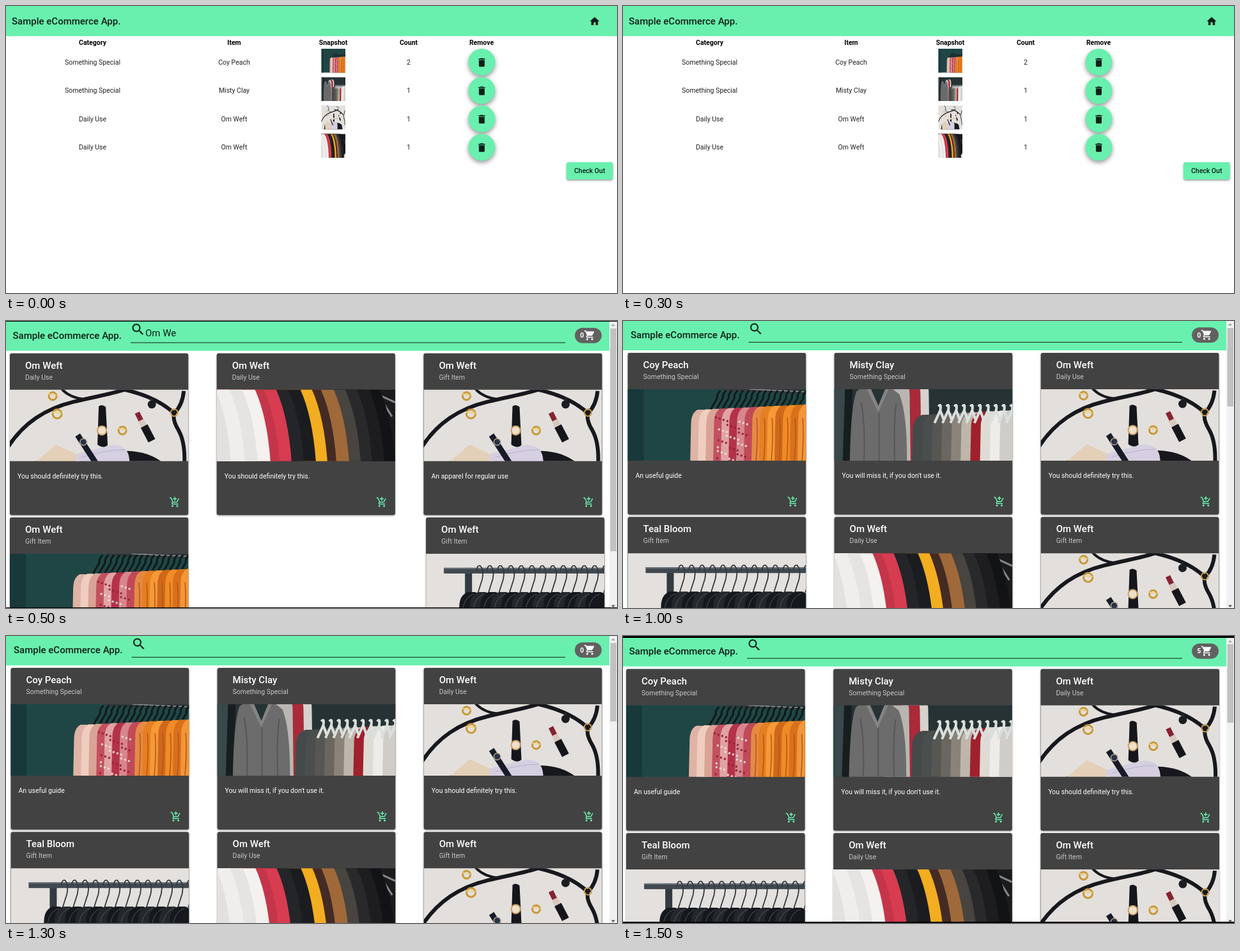
Write an HTML page with a canvas that moves like this. It is 956 by 450 pixels and loops after 2 s.

```html
<!DOCTYPE html>
<html lang="en">
<head>
<meta charset="utf-8">
<title>Shop demo</title>
<style>
  html, body { margin: 0; width: 956px; height: 450px; overflow: hidden; background: #fff; }
  canvas { display: block; }
</style>
</head>
<body>
<canvas id="stage" width="956" height="450"></canvas>
<script>
const ctx = document.getElementById('stage').getContext('2d');
const GREEN = '#69f0ae', DARK = '#424242', INK = 'rgba(0,0,0,.87)';
const PHOTO_W = 279, PHOTO_H = 112, PHOTO_FULL = 186;

const wheels = 'M7 18a2 2 0 1 0 0 4a2 2 0 1 0 0-4zM17 18a2 2 0 1 0 0 4a2 2 0 1 0 0-4z';
const icons = {
  home: 'M10 20v-6h4v6h5v-8h3L12 3 2 12h3v8z',
  trash: 'M6 19c0 1.1.9 2 2 2h8c1.1 0 2-.9 2-2V7H6v12zM19 4h-3.5l-1-1h-5l-1 1H5v2h14V4z',
  search: 'M15.5 14h-.79l-.28-.27C15.41 12.59 16 11.11 16 9.5 16 5.91 13.09 3 9.5 3S3 5.91 3 9.5 5.91 16 9.5 16c1.61 0 3.09-.59 4.23-1.57l.27.28v.79l5 4.99L20.49 19l-4.99-5zm-6 0C7.01 14 5 11.99 5 9.5S7.01 5 9.5 5 14 7.01 14 9.5 11.99 14 9.5 14z',
  cart: wheels + 'M1 2v2h2l3.6 7.59-1.35 2.45c-.16.28-.25.61-.25.96 0 1.1.9 2 2 2h12v-2H7.42c-.14 0-.25-.11-.25-.25l.03-.12.9-1.63h7.45c.75 0 1.41-.41 1.75-1.03l3.58-6.49c.08-.14.12-.31.12-.48 0-.55-.45-1-1-1H5.21l-.94-2H1z',
  addCart: wheels + 'M11 9h2V6h3V4h-3V1h-2v3H8v2h3v3zM7.17 14.75l.03-.12.9-1.63h7.45c.75 0 1.41-.41 1.75-1.03l3.86-7.01L19.42 4l-1.1 2-2.76 5H8.53L6.16 6 4.27 2H1v2h2l3.6 7.59-1.35 2.45c-.16.28-.25.61-.25.96 0 1.1.9 2 2 2h12v-2H7.42c-.13 0-.25-.11-.25-.25z'
};

function fill(color, d) {
  ctx.fillStyle = color;
  ctx.fill(new Path2D(d));
}
function line(color, width, d) {
  ctx.strokeStyle = color;
  ctx.lineWidth = width;
  ctx.stroke(new Path2D(d));
}
function rect(color, x, y, w, h) {
  ctx.fillStyle = color;
  ctx.fillRect(x, y, w, h);
}
function disc(color, x, y, r) {
  ctx.fillStyle = color;
  ctx.beginPath();
  ctx.arc(x, y, r, 0, 7);
  ctx.fill();
}
function ring(color, width, x, y, r) {
  ctx.strokeStyle = color;
  ctx.lineWidth = width;
  ctx.beginPath();
  ctx.arc(x, y, r, 0, 7);
  ctx.stroke();
}
function box(color, x, y, w, h, r, blur = 0, drop = 0) {
  ctx.save();
  ctx.shadowColor = 'rgba(0,0,0,.42)';
  ctx.shadowBlur = blur;
  ctx.shadowOffsetY = drop;
  ctx.fillStyle = color;
  ctx.beginPath();
  ctx.roundRect(x, y, w, h, r);
  ctx.fill();
  ctx.restore();
}
function text(str, x, y, size = 10.5, weight = 400, color = INK, align = 'left') {
  ctx.font = `${weight} ${size}px Roboto, sans-serif`;
  ctx.textAlign = align;
  ctx.fillStyle = color;
  ctx.fillText(str, x, y);
}
function icon(name, x, y, size, color) {
  ctx.save();
  ctx.translate(x, y);
  ctx.scale(size / 24, size / 24);
  fill(color, icons[name]);
  ctx.restore();
}

// A hanging garment with rounded shoulders, reaching below the crop.
function garment(color, x, top, w, flare = 3) {
  fill(color, `M${x + w * .35} ${top}h${w * .3}Q${x + w} ${top + 5} ${x + w} ${top + 24}L${x + w + flare} 150H${x - flare}L${x} ${top + 24}Q${x} ${top + 5} ${x + w * .35} ${top}Z`);
}

// Photos use a 279 x 112 crop and extend 37 units above and below it.
const photos = {
  rack() {
    rect('#1f4644', 0, -37, 279, 187);
    rect('#17393a', 0, -37, 25, 187);
    fill('#30383a', 'M150-3L279-1V7L150 3Z');
    line('#8d9595', 1.5, 'M190 0L279 4');
    for (let i = 0; i < 16; i++) {
      const x = 138 + i * 9;
      line('#0f191a', 3, `M${x + 7} 2Q${x + 1} 8 ${x + 2} 14L${x - 9} 33`);
    }
    const colors = ['#dfb3a6', '#efcdbf', '#d9a396', '#c3505f', '#e0a3a4', '#b3324a', '#d6868c', '#c04a58',
      '#e58a45', '#e57f22', '#f59a35', '#cf681b', '#f08b25', '#d9701c', '#f29638'];
    colors.forEach((c, i) => garment(c, 99 + i * 12, 32 - i * .6, 30, 2));
    for (let i = 0; i < 60; i++) {
      disc(i % 2 ? '#f0dcd6' : '#96203a', 138 + (i * 17) % 50, 44 + (i * 29) % 104, 1.7);
    }
    for (let i = 0; i < 7; i++) line('#b2561a', 1.5, `M${202 + i * 12} 45Q${205 + i * 12} 85 ${197 + i * 12} 149`);
  },
  knits() {
    rect('#273234', 0, -37, 279, 187);
    rect('#39484a', 0, -37, 18, 187);
    fill('#171e20', 'M18-37H30L24 150H12Z');
    garment('#d6d2cd', 106, -18, 42, 2);
    garment('#a92a38', 94, -16, 41, 2);
    garment('#b9b6b2', 80, -16, 38, 2);
    fill('#6c6c6d', 'M48-6L35 3Q24 30 24 150H113Q117 45 102 8L84-6L69 31Z');
    fill('#858485', 'M48-6L69 36L88-6L82-6L69 26L55-6Z');
    line('#565759', 2, 'M42 20Q51 70 44 149M97 22Q91 70 97 149M70 36V149');
    const colors = ['#444a49', '#4a4e4c', '#565653', '#6b665f', '#8b837a', '#beb6ab', '#a0202c', '#dedbd5', '#eeece8', '#d0ccc7'];
    colors.forEach((c, i) => garment(c, 123 + i * 15.2, 40 - i * .8, 44, 2));
    for (let i = 0; i < 10; i++) {
      const x = 160 + i * 12.5;
      line('#d9e0de', 4, `M${x + 3} 27Q${x + 8} 21 ${x + 6} 33L${x - 3} 53M${x + 6} 33L${x + 11} 47`);
    }
  },
  bag() {
    rect('#e3dfdc', 0, -37, 279, 187);
    fill('#17181d', 'M40 112L100 103L185 96Q215 97 236 112L246 150H30Z');
    line('#17181d', 6, 'M-3 90C22 52 55 30 100 19S168 6 200-8');
    line('#17181d', 4, 'M78-5Q90 12 116 15');
    line('#17181d', 6, 'M150-5C190 0 230 12 257 37');
    line('#17181d', 6, 'M272 2Q270 24 257 37Q254 48 264 64Q274 82 273 114');
    ring('#c59a48', 2, 257, 36, 5.5);
    fill('#e4cfb8', 'M42 112L72 86L108 103V150H45Z');
    fill('#d5cfe1', 'M103 101L158 87Q185 85 187 110V150H105Z');
    line('#b8b0c9', 1, 'M112 106Q150 94 181 94');
    fill('#15161b', 'M139 26Q144 22 150 27L153 87Q146 93 137 86Z');
    disc('#c7a06a', 144, 64, 8);
    disc('#f0dfc8', 144, 64, 6);
    line('#171b28', 9, 'M106 71L135 116');
    disc('#b8a58a', 115, 82, 6);
    disc('#27334b', 115, 82, 4.5);
    [[67, 10, 6], [74, 38, 7], [176, 64, 6]].forEach(([x, y, r]) => {
      ring('#c99936', 3, x, y, r);
      line('#edd18a', 2, `M${x - r} ${y - 3}L${x + r} ${y - 1}`);
    });
    line('#842433', 8, 'M199 36L205 48');
    line('#d7c8bd', 10, 'M205 48L210 58');
    line('#15161b', 12, 'M210 57L222 80');
    disc('#1c1d21', 222, 23, 6.5);
    line('#24252a', 4, 'M222 17V13');
    line('#17181d', 4, 'M70-37Q95-15 82 0M175-30L205-18');
  },
  shirts() {
    rect('#1b1b1e', 0, -37, 279, 187);
    line('#85888b', 3, 'M225-5L279 20M250 4L274 42');
    line('#5b2630', 2, 'M213 0L244 25L240 58');
    // Overlapping sleeves, back to front; each extends left behind the next.
    const sleeves = [[279, '#121316'], [262, '#1d1d20'], [243, '#29292c'], [225, '#48443f'], [207, '#a0693a'],
      [187, '#432b24'], [173, '#f3ad20'], [155, '#1b1c1f'], [136, '#242529'], [117, '#d73c51'],
      [98, '#c4354a'], [84, '#f4f1ee'], [64, '#e6e4e2'], [44, '#f0eeec'], [22, '#e3e1df']];
    sleeves.forEach(([x, color]) => {
      fill(color, `M-40-37H${x - 48}Q${x - 8} 5 ${x} 112L${x + 2} 150H-40Z`);
    });
    fill('#e1dfdf', 'M262 130L279 112V150H265Z');
  },
  bar() {
    rect('#e3e0dd', 0, -37, 279, 187);
    rect('#333a42', 61, 22, 11, 130);
    rect('#414850', 28, 22, 251, 9);
    rect('#697078', 28, 22, 251, 2);
    for (let i = 0; i < 13; i++) {
      const x = 79 + i * 16.4;
      garment(i % 2 ? '#24282c' : '#15191d', x - 27, 60, 38, 4);
      line('#33383d', 1.8, `M${x} 27Q${x + 1} 17 ${x + 6} 19Q${x + 12} 25 ${x + 9} 40L${x + 2} 62`);
      line('#50555a', 1, `M${x - 4} 63Q${x - 18} 68 ${x - 21} 85`);
    }
  }
};

function photo(name, x, y, w, h, bleed = 0) {
  ctx.save();
  ctx.beginPath();
  ctx.rect(x, y, w, h);
  ctx.clip();
  ctx.translate(x, y);
  ctx.scale(w / PHOTO_W, h / (PHOTO_H + 2 * bleed));
  ctx.translate(0, bleed);
  photos[name]();
  ctx.restore();
}

const products = {
  peach: ['Coy Peach', 'Something Special', 'rack', 'An useful guide'],
  clay: ['Misty Clay', 'Something Special', 'knits', "You will miss it, if you don't use it."],
  bloom: ['Teal Bloom', 'Gift Item', 'bar', ''],
  dailyBag: ['Om Weft', 'Daily Use', 'bag', 'You should definitely try this.'],
  dailyShirt: ['Om Weft', 'Daily Use', 'shirts', 'You should definitely try this.'],
  giftBag: ['Om Weft', 'Gift Item', 'bag', 'An apparel for regular use'],
  giftRack: ['Om Weft', 'Gift Item', 'rack', ''],
  giftBar: ['Om Weft', 'Gift Item', 'bar', '']
};

function card(id, x, y, w) {
  const [name, kind, picture, blurb] = products[id];
  box(DARK, x, y, w, 253.5, 3, 3, 1);
  text(name, x + 24, y + 24.2, 15, 500, '#fff');
  text(kind, x + 24, y + 41, 10.5, 400, 'rgba(255,255,255,.7)');
  photo(picture, x, y + 57, w, 112);
  text(blurb, x + 12, y + 196, 10.5, 400, '#fff');
  icon('addCart', x + 249.2, y + 224.2, 18, GREEN);
}

function cartPage() {
  rect(GREEN, 0, 0, 956, 47.3);
  text('Sample eCommerce App.', 9, 28.5, 15, 500);
  icon('home', 912, 15, 18, INK);
  const columns = [135.5, 357, 512, 630, 744];
  ['Category', 'Item', 'Snapshot', 'Count', 'Remove'].forEach((label, i) =>
    text(label, columns[i], 61, 10.5, 700, '#000', 'center'));
  [['peach', 2], ['clay', 1], ['dailyBag', 1], ['dailyShirt', 1]].forEach(([id, count], i) => {
    const y = 88 + i * 44.5;
    const [name, kind, picture] = products[id];
    [kind, name, null, String(count)].forEach((label, c) => {
      if (label) text(label, columns[c], y + 3.7, 10.5, 400, INK, 'center');
    });
    photo(picture, 493.4, y - 21, 37.6, 37.6, (PHOTO_FULL - PHOTO_H) / 2);
    box(GREEN, 723.4, y - 21, 42, 42, 21, 7, 3);
    icon('trash', 735.4, y - 8.5, 18, INK);
  });
  box(GREEN, 877, 245, 72.5, 27, 3, 3, 1.5);
  text('Check Out', 913.2, 262, 10.5, 500, INK, 'center');
}

function scrollbar(top, thumbTop, thumbEnd) {
  rect('#f1f1f1', 944, top, 12, 450);
  rect('#c1c1c1', 945.5, thumbTop, 9.5, thumbEnd - thumbTop);
  fill('#a3a3a3', `M947 ${top + 7}l3-3.5l3 3.5z`);
  fill('#505050', 'M947 445.5h6l-3 3.5z');
}

function shopPage({ left, top, pitch, width, query, count, thumbEnd, black, rows }) {
  rect(GREEN, 0, 0, 944, top - 4);
  text('Sample eCommerce App.', left + 4.5, top - 23, 15, 500);
  icon('search', left + 188.5, top - 49.5, 24, INK);
  text(query, 218, top - 26.5, 15);
  rect(INK, left + 189, top - 17.2, 875 - left - 189, 1);
  box('#616161', 890, top - 40, 42, 24, 12);
  text(count, 898.3, top - 24.3, 10.5, 700, '#fff');
  icon('cart', 904, top - 37.5, 18.5, '#fff');
  rows.forEach((ids, r) => ids.forEach((id, c) => {
    const shift = ids[1] || c < 2 ? 0 : 3.7;
    if (id) card(id, left + c * pitch + shift, top + r * 257.2, width);
  }));
  scrollbar(black[0], top - 39, thumbEnd);
  rect('#000', 0, 0, 956, black[0]);
  rect('#000', 0, 450 - black[1], 956, black[1]);
}

const catalogue = [['peach', 'clay', 'dailyBag'], ['bloom', 'dailyShirt', 'giftBag']];
const found = [['dailyBag', 'dailyShirt', 'giftBag'], ['giftRack', null, 'giftBar']];
const scenes = [
  cartPage,
  () => shopPage({ left: 6, top: 50.7, pitch: 323.7, width: 279.2, query: 'Om We', count: '0',
    thumbEnd: 361, black: [1, 1], rows: found }),
  () => shopPage({ left: 7.5, top: 50, pitch: 323.1, width: 278.7, query: '', count: '0',
    thumbEnd: 134, black: [0, 0], rows: catalogue }),
  () => shopPage({ left: 5, top: 51.7, pitch: 324.2, width: 279.6, query: '', count: '5',
    thumbEnd: 136, black: [3, 2], rows: catalogue })
];

function draw() {
  rect('#fff', 0, 0, 956, 450);
  scenes[Math.floor(performance.now() % 2000 / 500)]();
  requestAnimationFrame(draw);
}
draw();
</script>
</body>
</html>
```
